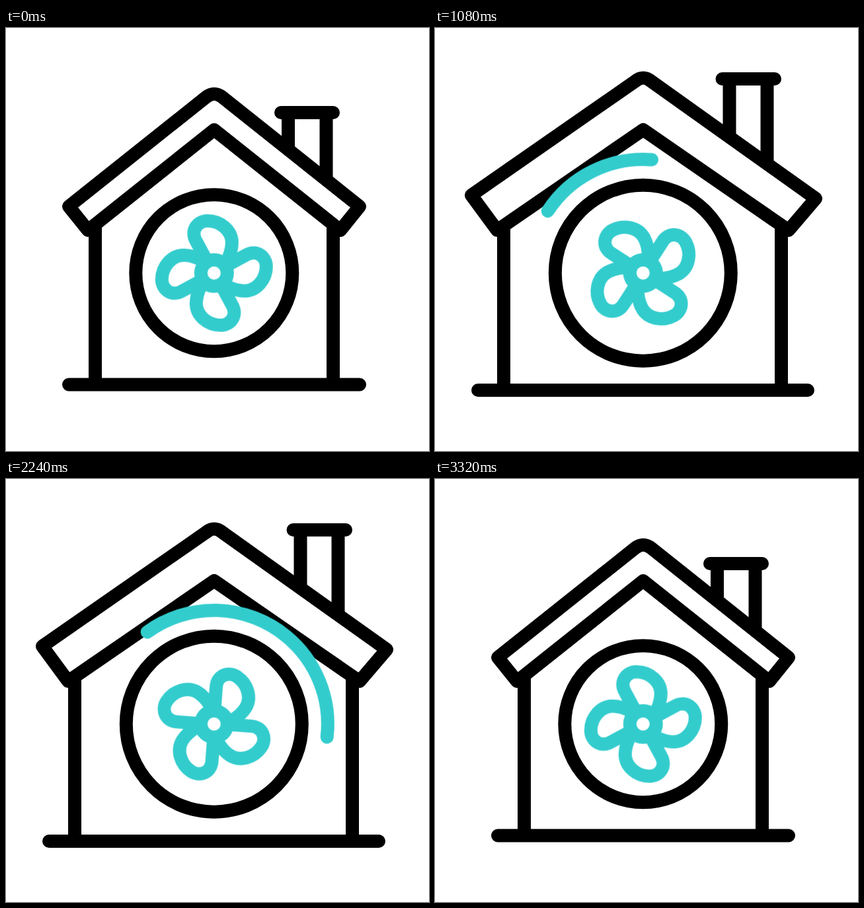
An HTML page that plays this animation: 640 by 640 pixels, repeating every 3.46 s.

```html
<!DOCTYPE html>
<html lang="en">
<head>
<meta charset="utf-8">
<title>House fan</title>
<style>
  @property --head { syntax: "<number>"; inherits: false; initial-value: 0; }
  @property --tail { syntax: "<number>"; inherits: false; initial-value: 0; }

  html, body { margin: 0; width: 100%; height: 100%; overflow: hidden; background: #fff; }
  svg { display: block; width: 100vw; height: 100vh; }

  .line { fill: none; stroke: #000; stroke-width: 20; stroke-linejoin: round; }
  .round { stroke-linecap: round; }
  .teal { stroke: #33cccd; }

  .roof, .posts, .bars, .ring {
    animation: 3460ms cubic-bezier(.333, 0, .667, 1) infinite;
  }
  .roof { animation-name: roof; }
  .posts { animation-name: posts; }
  .bars { animation-name: bars; }
  .ring { animation-name: ring; }

  @keyframes roof {
    0%, 5.78%, 88.44%, 100% {
      d: path("M124 306L95 270L303 104.4Q315 95 327 104.4L535 270L506 306L315 154Z");
    }
    17.34%, 78.03% {
      d: path("M94 306L55 253L303 80.5Q315 70.5 327 80.5L576 258L535 306L315 154Z");
    }
  }
  /* walls, then chimney sides */
  @keyframes posts {
    0%, 5.78%, 88.44%, 100% {
      d: path("M135 298V540M495 298V540M427 128V183M484.5 128V229");
    }
    17.34%, 78.03% {
      d: path("M104 300V548M524 300V548M445.5 77V163M502.5 77V204");
    }
  }
  /* ground, then chimney cap */
  @keyframes bars {
    0%, 5.78%, 88.44%, 100% { d: path("M95 539.5L535 539.5M416 128L495 128"); }
    17.34%, 78.03% { d: path("M65 548L564 548M434.5 77L514 77"); }
  }
  @keyframes ring {
    0%, 5.78%, 88.44%, 100% { r: 118.5px; }
    17.34%, 78.03% { r: 133px; }
  }

  .fan { animation: spin 3460ms cubic-bezier(.19, 0, .81, 1) infinite; }
  @keyframes spin {
    0%, 5.78% { transform: rotate(0deg); }
    95.95%, 100% { transform: rotate(-1260deg); }
  }

  /* the sweep's front slows down while its back speeds up */
  .sweep {
    --len: 894.6;
    stroke-dasharray: calc((var(--head) - var(--tail)) * var(--len) * 1px) 2000px;
    stroke-dashoffset: calc(var(--tail) * var(--len) * -1px);
    animation:
      head 3460ms cubic-bezier(.33, .69, .65, 1) infinite,
      tail 3460ms cubic-bezier(.35, 0, .67, .31) infinite,
      show 3460ms step-end infinite;
  }
  @keyframes head {
    0%, 28.96% { --head: 0; }
    49.77%, 58.54% { --head: 1; }
    58.55% { --head: 0; }
    79.36%, 100% { --head: 1; }
  }
  @keyframes tail {
    0%, 28.96% { --tail: 0; }
    49.77%, 58.54% { --tail: 1; }
    58.55% { --tail: 0; }
    79.36%, 100% { --tail: 1; }
  }
  @keyframes show {
    0%, 49.77%, 79.36%, 100% { visibility: hidden; }
    28.96%, 58.55% { visibility: visible; }
  }
</style>
</head>
<body>
<svg viewBox="0 0 640 640">
  <defs>
    <path id="blade" d="M-13 -22L-27 -48C-37 -65 -24 -79 -10 -79C10 -79 27 -64 27 -46C27 -36 24 -28 21 -21"/>
  </defs>
  <path class="line posts" d="M135 298V540M495 298V540M427 128V183M484.5 128V229"/>
  <path class="line round bars" d="M95 539.5L535 539.5M416 128L495 128"/>
  <path class="line roof" d="M124 306L95 270L303 104.4Q315 95 327 104.4L535 270L506 306L315 154Z"/>
  <g transform="translate(314.8 370.7)">
    <circle class="line ring" r="118.5"/>
    <g class="line teal fan">
      <circle r="20"/>
      <use href="#blade"/>
      <use href="#blade" transform="rotate(90)"/>
      <use href="#blade" transform="rotate(180)"/>
      <use href="#blade" transform="rotate(270)"/>
    </g>
    <!-- radius 172, from -150 to 148 degrees -->
    <path class="line round teal sweep" d="M-148.96 -86A172 172 0 1 1 -145.86 91.15"/>
  </g>
</svg>
</body>
</html>
```
